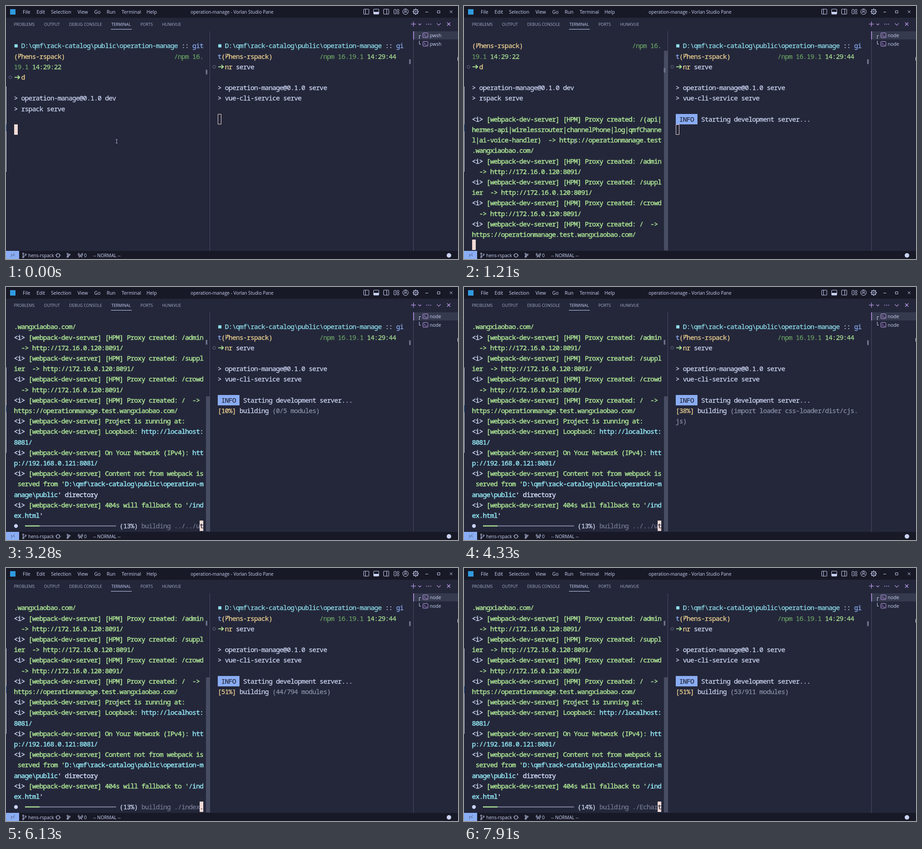
Write an HTML page with a canvas that moves like this. It is 999 by 560 pixels and loops after 8 s.

```html
<!DOCTYPE html>
<html lang="en">
<head>
<meta charset="utf-8">
<title>Terminal</title>
<style>
html, body { margin: 0; width: 999px; height: 560px; overflow: hidden; background: #24273a; }
canvas { display: block; }
</style>
</head>
<body>
<canvas id="stage" width="999" height="560"></canvas>
<script>
const ctx = document.getElementById('stage').getContext('2d');
const LOOP = 8000, CELL = 8.05, ROW = 23.2, TOP = 88.2;
const LEFT = 17.8, RIGHT = 468.1;
const MONO = '14.8px "Noto Sans Mono", "DejaVu Sans Mono", monospace';
const UI = '"Open Sans", "Noto Sans", sans-serif';
const BASE = '#24273a', CRUST = '#181926', TEXT = '#cad3f5', GREEN = '#a9e092';
const MAUVE = '#c6a0f6', BLUE = '#8aadf4', ROSE = '#f4dbd6', LINE = '#494d64';

// Colour codes used as "~x" inside terminal lines
const INK = {
  t: '#d0d9f6', g: GREEN, c: '#8fe1ee', y: '#f3d694', b: BLUE,
  n: '#68a063', d: '#8a90a8', m: '#747a93', k: BASE
};

const raw = String.raw;
const tag = '~t<i> ~g[webpack-dev-server] ';
const proxy = tag + '[HPM] Proxy created: ';
const path = raw`~c  D:\qmf\rack-catalog\public\operation-manage ~t:: `;
const branch = '~y(\u0001hens-rspack)';

const log = [
  path + '~bgit',
  branch + ' '.repeat(30) + '~n/npm 16.',
  '~n19.1 ~g14:29:22',
  '~y  d',
  '',
  '~t> operation-manage@0.1.0 dev',
  '~t> rspack serve',
  '',
  proxy + '/(api|',
  '~ghermes-api|wirelessrouter|channelPhone|log|qmfChanne',
  '~gl|ai-voice-handler)  -> https://operationmanage.test',
  '~g.wangxiaobao.com/',
  proxy + '/admin',
  '~g  -> http://172.16.0.120:8091/',
  proxy + '/suppl',
  '~gier  -> http://172.16.0.120:8091/',
  proxy + '/crowd',
  '~g  -> http://172.16.0.120:8091/',
  proxy + '/  ->',
  '~ghttps://operationmanage.test.wangxiaobao.com/',
  tag + 'Project is running at:',
  tag + 'Loopback: ~chttp://localhost:',
  '~c8081/',
  tag + 'On Your Network (IPv4): ~chtt',
  '~cp://192.168.0.121:8081/',
  tag + 'Content not from webpack is',
  raw`~g served from '~cD:\qmf\rack-catalog\public\operation-m`,
  raw`~canage\public~t' directory`,
  tag + "404s will fallback to '~c/ind",
  "~cex.html~t'"
];

const server = [
  path + '~bgi',
  '~bt' + branch + ' '.repeat(13) + '~n/npm 16.19.1 ~g14:29:44',
  '~y  nr ~tserve',
  '',
  '~t> operation-manage@0.1.0 serve',
  '~t> vue-cli-service serve'
];

// [start, first log row, rows shown]
const views = [[0, 0, 8], [1210, 1, 19], [1740, 11, 19]];

// [start, percent, file]
const builds = [
  [1740, 65, raw`D:\qmf\r`], [1860, 14, './src/ma'], [2570, 13, '../../ut'],
  [4600, 14, './router'], [6130, 13, './index.'], [6700, 13, './shared'],
  [6970, 14, './Dialog'], [7090, 14, './Upload'], [7240, 14, './Search'],
  [7390, 14, './Header'], [7510, 14, './Button'], [7910, 14, './Echart']
];

// [start, percent, detail, wrapped rest]
const bundles = [
  [2450, 10, '(0/1 modules)'], [2690, 10, '(0/4 modules)'], [3280, 10, '(0/5 modules)'],
  [3880, 38, '(10/39 modules)'], [4180, 38, '(12/57 modules)'],
  [4330, 38, '(import loader css-loader/dist/cjs.', 'js)'],
  [4450, 40, '(22/86 modules)'],
  [4750, 42, '(import loader vue-loader/dist/inde', 'x.js)'],
  [4870, 47, '(import loader babel-loader/lib/ind', 'ex.js)'],
  [5310, 51, '(37/712 modules)'], [5730, 51, '(44/794 modules)'], [6390, 51, '(53/911 modules)']
];

const at = (list, t) => list.filter(s => s[0] <= t).pop();

function box(x, y, w, h, color) {
  ctx.fillStyle = color;
  ctx.fillRect(x, y, w, h);
}

function frame(x, y, w, h, color, width = 1, r = 0) {
  ctx.strokeStyle = color;
  ctx.lineWidth = width;
  ctx.beginPath();
  ctx.roundRect(x, y, w, h, r);
  ctx.stroke();
}

function line(color, width, ...p) {
  ctx.strokeStyle = color;
  ctx.lineWidth = width;
  ctx.beginPath();
  for (let i = 0; i < p.length; i += 2) ctx.lineTo(p[i], p[i + 1]);
  ctx.stroke();
}

function arc(x, y, r, color, width = 1, from = 0, to = 2 * Math.PI) {
  ctx.strokeStyle = color;
  ctx.lineWidth = width;
  ctx.beginPath();
  ctx.arc(x, y, r, from, to);
  ctx.stroke();
}

function dot(x, y, r, color) {
  ctx.fillStyle = color;
  ctx.beginPath();
  ctx.arc(x, y, r, 0, 2 * Math.PI);
  ctx.fill();
}

function label(str, x, y, size, color = TEXT, align = 'left') {
  ctx.font = `${size}px ${UI}`;
  ctx.textAlign = align;
  ctx.fillStyle = color;
  ctx.fillText(str, x, y);
}

const mid = row => TOP + row * ROW;

// Fills terminal cells, snapped to whole pixels
function cells(x0, row, col, count, color) {
  const x = Math.round(x0 + col * CELL), y = Math.round(mid(row) - ROW / 2);
  box(x, y, Math.round(count * CELL), 23, color);
}

function fork(x, y, color, s = 1) {
  arc(x - 2.5 * s, y - 4 * s, 1.5 * s, color);
  arc(x - 2.5 * s, y + 4 * s, 1.5 * s, color);
  arc(x + 3 * s, y - 2 * s, 1.5 * s, color);
  line(color, 1, x - 2.5 * s, y - 2.5 * s, x - 2.5 * s, y + 2.5 * s);
  line(color, 1, x + 3 * s, y - .5 * s, x + 2 * s, y + 1 * s, x - 2.5 * s, y + 1.5 * s);
}

function branchMark(x, y) {
  line(INK.y, 1.4, x + 2, y - 6, x + 2, y + 5);
  line(INK.y, 1.4, x + 2, y + 2, x + 6, y - 1, x + 6, y - 5);
  line(INK.y, 1.2, x + 4, y - 3, x + 6, y - 5.5, x + 8, y - 3);
}

// Places every character on the terminal grid; weight thickens the strokes
function print(str, x0, row, col = 0, weight = .25) {
  const y = mid(row);
  ctx.font = MONO;
  ctx.textAlign = 'center';
  ctx.lineJoin = 'round';
  for (let i = 0; i < str.length; i++) {
    const ch = str[i];
    if (ch === '~') {
      ctx.fillStyle = INK[str[++i]];
      continue;
    }
    const x = x0 + col++ * CELL;
    if (ch === '\u0001') branchMark(x, y);
    else if (ch !== ' ') {
      ctx.strokeStyle = ctx.fillStyle;
      ctx.lineWidth = weight;
      ctx.fillText(ch, x + CELL / 2, y + 5.2);
      ctx.strokeText(ch, x + CELL / 2, y + 5.2);
    }
  }
}

function promptMark(x, row) {
  box(x + 1, mid(row) - 3.5, 7, 7, INK.c);
}

function arrow(x, row) {
  const y = mid(row);
  arc(x - 8, y, 3.2, '#6e738d');
  line(GREEN, 2, x + 1, y, x + 12, y);
  line(GREEN, 2, x + 8, y - 4, x + 12.4, y, x + 8, y + 4);
}

function chevron(x, y, s, color) {
  line(color, 1.1, x - s, y - s / 2, x, y + s / 2, x + s, y - s / 2);
}

function titleBar() {
  box(0, 0, 999, 26, CRUST);
  box(9, 7, 12, 12, '#2f9be0');
  const menu = { File: 37, Edit: 67.5, Selection: 99.5, View: 158, Go: 195, Run: 222.5, Terminal: 255.5, Help: 310.5 };
  for (const name in menu) label(name, menu[name], 17, 10.6);
  label('operation-manage - Vorlan Studio Pane', 499.5, 17, 10, TEXT, 'center');

  for (const x of [790.5, 812.5, 834.5]) frame(x, 7, 11.5, 11, TEXT, 1, 1);
  line(TEXT, 1, 794.5, 7, 794.5, 18);
  box(813, 13, 11, 5, TEXT);
  line(TEXT, 1, 841.5, 7, 841.5, 18);
  frame(857.5, 7.5, 4.5, 10, TEXT, 1, 1);
  frame(864.5, 7.5, 4, 4, TEXT, 1, 1);
  frame(864.5, 13.5, 4, 4, TEXT, 1, 1);
  arc(883, 12.5, 6.2, TEXT);
  arc(883, 10.5, 2.3, TEXT);
  arc(883, 17, 4, TEXT, 1, Math.PI * 1.1, Math.PI * 1.9);
  arc(905.5, 12.5, 4.7, TEXT, 1.3);
  arc(905.5, 12.5, 1.7, TEXT);
  for (let i = 0; i < 8; i++) {
    const c = Math.cos(i * Math.PI / 4), s = Math.sin(i * Math.PI / 4);
    line(TEXT, 2, 905.5 + c * 4.5, 12.5 + s * 4.5, 905.5 + c * 6.7, 12.5 + s * 6.7);
  }
  line(TEXT, 1, 927, 13.5, 933, 13.5);
  frame(953.5, 10.5, 5.5, 5, TEXT);
  line(TEXT, 1, 981, 10, 986.5, 15.5);
  line(TEXT, 1, 986.5, 10, 981, 15.5);
}

function panelHeader() {
  const tabs = { PROBLEMS: 17.5, OUTPUT: 84, 'DEBUG CONSOLE': 139.5, TERMINAL: 233, PORTS: 297, HUNKVUE: 345 };
  for (const name in tabs) label(name, tabs[name], 44.2, 8.9, name === 'TERMINAL' ? TEXT : '#a5adcb');
  box(232, 51, 46, 1, TEXT);
  line(MAUVE, 1.2, 895, 40, 906, 40);
  line(MAUVE, 1.2, 900.5, 34.5, 900.5, 45.5);
  chevron(914.5, 40.5, 3, MAUVE);
  for (const x of [930, 934.3, 938.6]) dot(x, 40.3, 1, MAUVE);
  chevron(956.5, 40.5, 4.2, MAUVE);
  line(MAUVE, 1.2, 975, 36.5, 982, 43.5);
  line(MAUVE, 1.2, 982, 36.5, 975, 43.5);
}

function sideList(t) {
  box(450, 56, 1, 486, LINE);
  box(900, 56, 1, 486, LINE);
  box(901, 56, 98, 18, '#363a4f');
  box(900, 56, 1.5, 18, MAUVE);
  line(TEXT, 1, 917, 65.5, 913.5, 65.5, 913.5, 73);
  line(TEXT, 1, 913.5, 77, 913.5, 84.5, 917, 84.5);
  [65, 84].forEach((y, i) => {
    frame(921.5, y - 5.5, 11, 10.5, MAUVE, 1, 1);
    line(MAUVE, 1, 923.7, y - 3, 926.5, y - .5, 923.7, y + 2);
    line(MAUVE, 1, 927, y + 2.5, 930.5, y + 2.5);
    label(t < (i ? 530 : 810) ? 'pwsh' : 'node', 936.5, y + 4, 10.5);
  });
}

function statusBar() {
  box(0, 542, 999, 18, CRUST);
  box(0, 542, 29, 18, BLUE);
  line('#363a4f', 1, 11, 549, 14, 552, 11, 555);
  line('#363a4f', 1, 19, 547.5, 16, 550.5, 19, 553.5);
  fork(40.5, 552, TEXT);
  label('hens-rspack', 49, 555.8, 10.1);
  arc(115, 552, 4, TEXT, 1.1, .3, Math.PI);
  arc(115, 552, 4, TEXT, 1.1, Math.PI + .3, Math.PI * 2);
  line(TEXT, 1, 109, 550.5, 111, 552.5, 113, 550.5);
  line(TEXT, 1, 117, 553.5, 119, 551.5, 121, 553.5);
  fork(138, 552, TEXT, .9);
  line(TEXT, 1, 138, 548, 138, 556);
  line(TEXT, 1, 161, 557, 164.5, 550, 168, 557);
  line(TEXT, 1, 162.5, 554.5, 166.5, 554.5);
  for (const r of [3, 5]) {
    arc(164.5, 550, r, TEXT, 1, -.8, .8);
    arc(164.5, 550, r, TEXT, 1, Math.PI - .8, Math.PI + .8);
  }
  label('0', 172.5, 555.8, 10.1);
  label('-- NORMAL --', 192.5, 555.8, 10.1);
  dot(979, 552, 5, TEXT);
}

function progress(t) {
  const [, pct, file] = at(builds, t);
  const y = mid(19), x = LEFT + 3 * CELL, done = Math.ceil(pct / 4) * CELL;
  dot(22, y, 4.2, TEXT);
  box(x, y - 1.3, 25 * CELL, 2.4, INK.m);
  box(x, y - 1.3, done, 2.4, GREEN);
  cells(LEFT, 19, 51, 1, ROSE);
  print(`~t(${pct}%) ~mbuilding ${file.slice(0, 7)}~k${file[7]}`, LEFT, 19, 29);
}

function leftPane(t) {
  const [start, first, count] = at(views, t);
  if (start === 1210) box(442, 99, 8, 442, LINE);
  if (start === 1740) box(442, 242, 8, 299, LINE);
  box(441.5, [141, 137, 117][views.findIndex(v => v[0] === start)], 3.5, 10.5, '#6e738d');
  for (let i = 0; i < count; i++) {
    const row = first + i;
    print(log[row], LEFT, i, 0, row > 7 ? .55 : .25);
  }
  if (first === 0) promptMark(LEFT, 0);
  if (first < 4) arrow(LEFT, 3 - first);
  if (t >= 1740) progress(t);
  else cells(LEFT, count, 0, 1, ROSE);
}

function rightPane(t) {
  box(891, 118, 3.5, 10.5, '#6e738d');
  server.forEach((s, i) => print(s, RIGHT, i));
  promptMark(RIGHT, 0);
  arrow(RIGHT, 2);
  if (t >= 530) {
    cells(RIGHT, 7, 0, 6, BLUE);
    print('~k INFO  ~tStarting development server...', RIGHT, 7);
  }
  if (t < 2450) {
    const y = Math.round(mid(t < 530 ? 7 : 8) - ROW / 2);
    frame(468.5, y + .5, 7, 22, ROSE);
    return;
  }
  const [, pct, detail, rest = ''] = at(bundles, t);
  print(`~y[${pct}%] ~tbuilding ~d${detail}`, RIGHT, 8);
  print('~d' + rest, RIGHT, 9);
}

function pointer() {
  const c = '#a5adcb';
  line(c, 1, 244.5, 296, 244.5, 303);
  line(c, 1, 242.5, 295.5, 246.5, 295.5);
  line(c, 1, 242.5, 303.5, 246.5, 303.5);
}

function edges() {
  box(0, 178, 1, 189, '#d8dae2');
  box(0, 262, 1, 15, '#3f78c8');
  box(998, 113, 1, 8, '#e6e8ee');
}

function draw(t) {
  box(0, 0, 999, 560, BASE);
  titleBar();
  panelHeader();
  sideList(t);
  leftPane(t);
  rightPane(t);
  pointer();
  statusBar();
  edges();
}

function tick() {
  draw(performance.now() % LOOP);
  requestAnimationFrame(tick);
}
tick();
</script>
</body>
</html>
```
